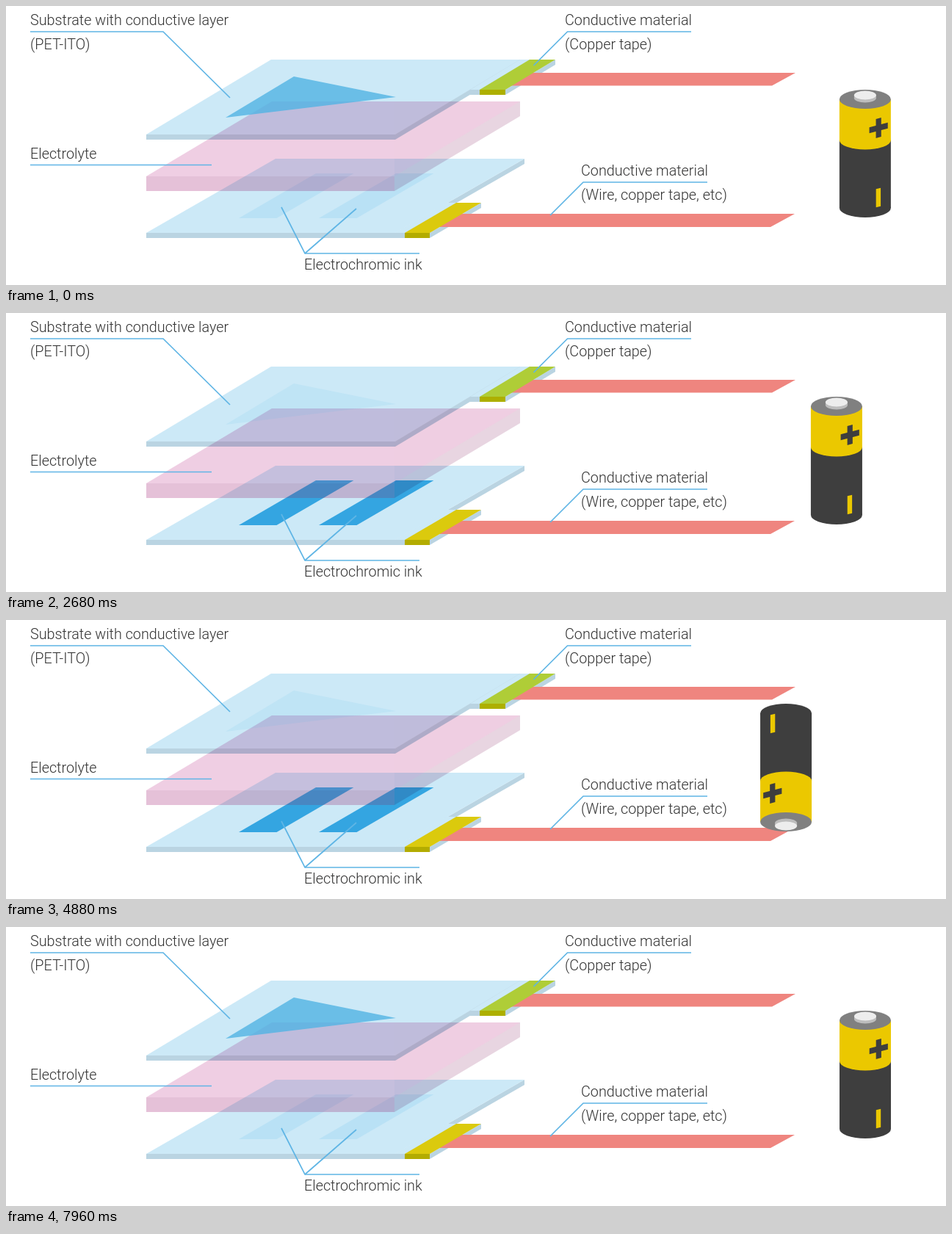
An HTML page with a canvas that plays this animation: 1280x380 px, repeating every 8 s.

```html
<!DOCTYPE html>
<html lang="en">
<head>
<meta charset="utf-8">
<title>Electrochromic display layers</title>
<style>
  html, body { margin: 0; width: 100%; height: 100%; overflow: hidden; background: #fff; }
  canvas { display: block; width: 1280px; height: 380px; }
</style>
</head>
<body>
<canvas id="stage" width="1280" height="380"></canvas>
<script>
const ctx = document.getElementById('stage').getContext('2d');
const LOOP = 8000;
const PLATE = '#cce9f7', EDGE = '#bad4e2', INK = '#34a5e1';
const DARK = '#3e3e3e', YELLOW = '#ebc800';

// Slabs: front left corner, width, shift of the back edge, thickness
const slab = (x, y, w, dx, dy, depth = 0) => ({ x, y, w, dx, dy, depth });
const GEL = slab(191, 232, 338, 171, 102, 20);
const UPPER = slab(191, 175, 339, 170, 102, 7);
const LOWER = slab(191, 309, 339, 176, 101, 7);
const UPPER_TAB = slab(632, 114, 48, 68, 41, 7);
const LOWER_TAB = slab(530, 309, 47, 70, 41, 7);
const UPPER_TAPE = slab(680, 108.5, 363, 32, 17.5);
const LOWER_TAPE = slab(580, 301, 461, 33, 18);

const clamp = v => Math.max(0, Math.min(1, v));
const ramp = (t, from, to) => clamp((t - from) / (to - from));

function trace(p) {
  ctx.beginPath();
  for (let i = 0; i < p.length; i += 2) ctx.lineTo(p[i], p[i + 1]);
}

function poly(color, p, alpha = 1) {
  trace(p);
  ctx.globalAlpha = alpha;
  ctx.fillStyle = color;
  ctx.fill();
  ctx.globalAlpha = 1;
}

function topFace(color, { x, y, w, dx, dy }, alpha) {
  poly(color, [x, y, x + dx, y - dy, x + dx + w, y - dy, x + w, y], alpha);
}

function frontFace(color, { x, y, w, depth }) {
  poly(color, [x, y, x + w, y, x + w, y + depth, x, y + depth]);
}

function box(s, top, front, side) {
  const r = s.x + s.w, back = s.y - s.dy;
  poly(side, [r, s.y, r + s.dx, back, r + s.dx, back + s.depth, r, s.y + s.depth]);
  frontFace(front, s);
  topFace(top, s);
}

function clipped({ x, y, w, dx, dy, depth }, draw) {
  ctx.save();
  trace([x, y, x + dx, y - dy, x + dx + w, y - dy,
         x + dx + w, y - dy + depth, x + w, y + depth, x, y + depth]);
  ctx.clip();
  draw();
  ctx.restore();
}

function multiplied(draw) {
  ctx.globalCompositeOperation = 'multiply';
  draw();
  ctx.globalCompositeOperation = 'source-over';
}

function line(...p) {
  trace(p);
  ctx.strokeStyle = '#5fb5e5';
  ctx.lineWidth = 1.7;
  ctx.stroke();
}

function ellipse(color, x, y, rx, ry) {
  ctx.beginPath();
  ctx.ellipse(x, y, rx, ry, 0, 0, 2 * Math.PI);
  ctx.fillStyle = color;
  ctx.fill();
}

function lowerPlate(ink) {
  box(LOWER, PLATE, EDGE, EDGE);
  box(LOWER_TAB, PLATE, EDGE, EDGE);
  for (const x of [317, 426]) topFace(INK, slab(x, 289, 51.5, 105, 61), 0.12 + 0.88 * ink);
}

function gel() {
  multiplied(() => box(GEL, '#efcee2', '#e3bfd5', '#e8d5e1'));
  // A thin veil keeps the ink under the gel from going too dark.
  clipped(GEL, () => {
    ctx.globalAlpha = 0.13;
    ctx.fillStyle = '#efcee2';
    ctx.fillRect(191, 130, 338, 122);
    ctx.globalAlpha = 1;
  });
}

function bubbles(charge, p) {
  let seed = 7;
  const random = () => (seed = seed * 16807 % 2147483647) / 2147483647;
  const fade = Math.min(1, p / 0.2, (1 - p) / 0.2);
  clipped(GEL, () => {
    ctx.strokeStyle = '#fff';
    ctx.lineWidth = 1.5;
    ctx.globalAlpha = 0.22 * fade;
    for (let i = 0; i < 13; i++) {
      const x = 235 + 33 * i;
      const r = 9 + 9 * random();
      const y = 212 - 0.12 * (x - 235) + 50 * (random() - 0.5);
      const drift = 75 * (charge - 0.5) * (i % 2 ? -1 : 1);
      ctx.beginPath();
      ctx.arc(x, y + drift, r, 0, 2 * Math.PI);
      ctx.stroke();
      ctx.beginPath();
      ctx.arc(x, y + drift, r * 0.74, -1.2, -0.2);
      ctx.stroke();
    }
  });
}

function upperPlate(ink) {
  multiplied(() => box(UPPER, PLATE, EDGE, EDGE));
  box(UPPER_TAB, PLATE, EDGE, EDGE);
  poly('#52b4e4', [392, 96, 531, 124, 299, 152], 0.11 + 0.69 * ink);
}

function signs(tape, y, offset, t, plus) {
  const gap = 38.35, speed = 0.0767;
  const shift = (((offset - speed * t) % gap) + gap) % gap;
  clipped(tape, () => {
    ctx.fillStyle = DARK;
    for (let x = tape.x - gap + shift; x < 1090; x += gap) {
      ctx.fillRect(x - 6.5, y - 2.1, 13, 4.2);
      if (plus) ctx.fillRect(x - 2.1, y - 6.5, 4.2, 13);
    }
  });
}

function copper(x, y, w, dx, top, front) {
  const s = slab(x, y, w, dx, 41, 7);
  topFace(top, s);
  frontFace(front, s);
}

function slanted(color, x, y, w, h) {
  const k = 0.25;
  poly(color, [x - w, y - h + k * w, x + w, y - h - k * w,
               x + w, y + h - k * w, x - w, y + h + k * w]);
}

function battery(x, angle) {
  ctx.save();
  ctx.translate(x, 201);
  ctx.rotate(angle);
  ellipse(DARK, 0, 74, 35, 13);
  ctx.fillRect(-35, -18, 70, 92);
  ellipse(YELLOW, 0, -18, 35, 12.5);
  ctx.fillRect(-35, -74, 70, 56);
  ellipse('#808080', 0, -74, 35, 13);
  ellipse('#bdbdbd', 0, -75.5, 15, 6);
  ctx.fillRect(-15, -79.5, 30, 4);
  ellipse('#ededed', 0, -79.5, 15, 6);
  slanted(DARK, 18.3, -35, 12.6, 4);
  slanted(DARK, 18.3, -35, 3.6, 13);
  slanted(YELLOW, 18, 60, 3.2, 12.5);
  ctx.restore();
}

function label(x, y, ...rows) {
  ctx.font = '300 19.8px Roboto, "Open Sans", sans-serif';
  ctx.fillStyle = '#333';
  rows.forEach((row, i) => ctx.fillText(row, x, y + 32.5 * i));
}

function labels() {
  line(33, 35, 214, 35, 305, 125);
  line(33, 216.5, 280, 216.5);
  line(933, 35, 764.5, 35, 718.5, 81);
  line(955, 240, 786, 240, 741, 285);
  line(563, 337, 407, 337, 375, 274);
  line(407, 337, 477, 276);
  label(33, 26, 'Substrate with conductive layer', '(PET-ITO)');
  label(33, 208, 'Electrolyte');
  label(761, 26, 'Conductive material', '(Copper tape)');
  label(783, 231, 'Conductive material', '(Wire, copper tape, etc)');
  label(406, 359, 'Electrochromic ink');
}

function draw(t) {
  const charge = ramp(t, 1000, 2000) - ramp(t, 5000, 6000);
  const near = ramp(t, 0, 1000) - ramp(t, 2000, 3000) +
               ramp(t, 4000, 5000) - ramp(t, 6000, 7000);
  const turn = ramp(t, 3000, 4000) + ramp(t, 7000, 7960);
  const first = t >= 1000 && t < 2000;
  const second = t >= 5000 && t < 6000;
  const p = (t % 1000) / 1000;

  ctx.fillStyle = '#fff';
  ctx.fillRect(0, 0, 1280, 380);
  lowerPlate(charge);
  gel();
  if (first || second) bubbles(charge, p);
  upperPlate(1 - charge);
  topFace('#ef857f', UPPER_TAPE);
  topFace('#ef857f', LOWER_TAPE);
  if (first || second) {
    signs(UPPER_TAPE, 99.5, first ? 90.4 : 103, 1000 * p, first);
    signs(LOWER_TAPE, 292.5, first ? 76 : 67, 1000 * p, second);
  }
  copper(645, 114, 35, 68, '#afcd37', '#adaf00');
  copper(543, 309, 34, 70, '#dbca0d', '#b3ac00');
  labels();
  battery(1170 - 122.5 * near, Math.PI * turn);
}

const start = performance.now();
function tick() {
  draw((performance.now() - start) % LOOP);
  requestAnimationFrame(tick);
}
tick();
</script>
</body>
</html>
```
